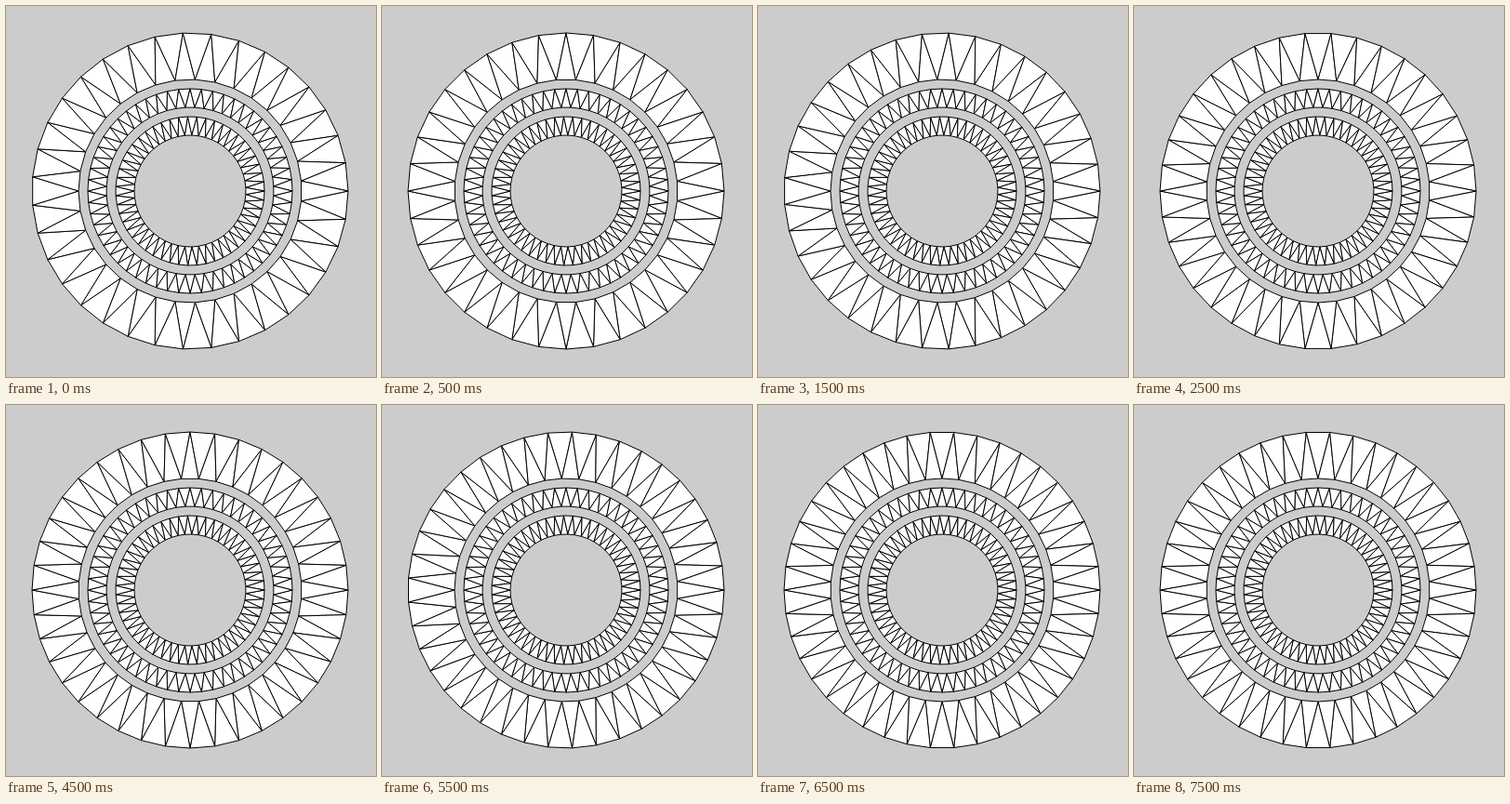
Recreate the animation shown at these times as an HTML page with a canvas. Size 398x399 px, loop 8 s.

```html
<!DOCTYPE html>
<html>
<head>
<meta charset="utf-8">
<style>
  html, body { margin: 0; width: 100%; height: 100%; overflow: hidden; background: #ccc; }
  canvas { display: block; }
</style>
</head>
<body>
<canvas width="398" height="399"></canvas>
<script>
const ctx = document.querySelector('canvas').getContext('2d');
const LOOP = 8000, STEP = 1000, FIRST = 35, LAST = 42;

// A closed triangle strip: n outer points, n inner points half a step further on.
function ring(inner, outer, n) {
  const lineTo = k => {
    const a = k * Math.PI / n, r = k % 2 ? inner : outer;
    ctx.lineTo(198 + r * Math.cos(a), 199 + r * Math.sin(a));
  };
  for (let k = 0; k < 2 * n; k++) {
    ctx.beginPath();
    lineTo(k);
    lineTo(k + 1);
    lineTo(k + 2);
    ctx.closePath();
    ctx.fill();
    ctx.stroke();
  }
}

function draw(now) {
  const t = now % LOOP;
  const count = Math.min(LAST, FIRST + Math.floor((t + STEP / 2) / STEP));
  ctx.fillStyle = '#ccc';
  ctx.fillRect(0, 0, 398, 399);
  ctx.fillStyle = '#fff';
  ctx.strokeStyle = '#000';
  ctx.lineJoin = 'round';
  ring(60, 80, 51);
  ring(90, 110, 56);
  ring(120, 170, count);
}

function tick() {
  draw(performance.now());
  requestAnimationFrame(tick);
}
tick();
</script>
</body>
</html>
```
